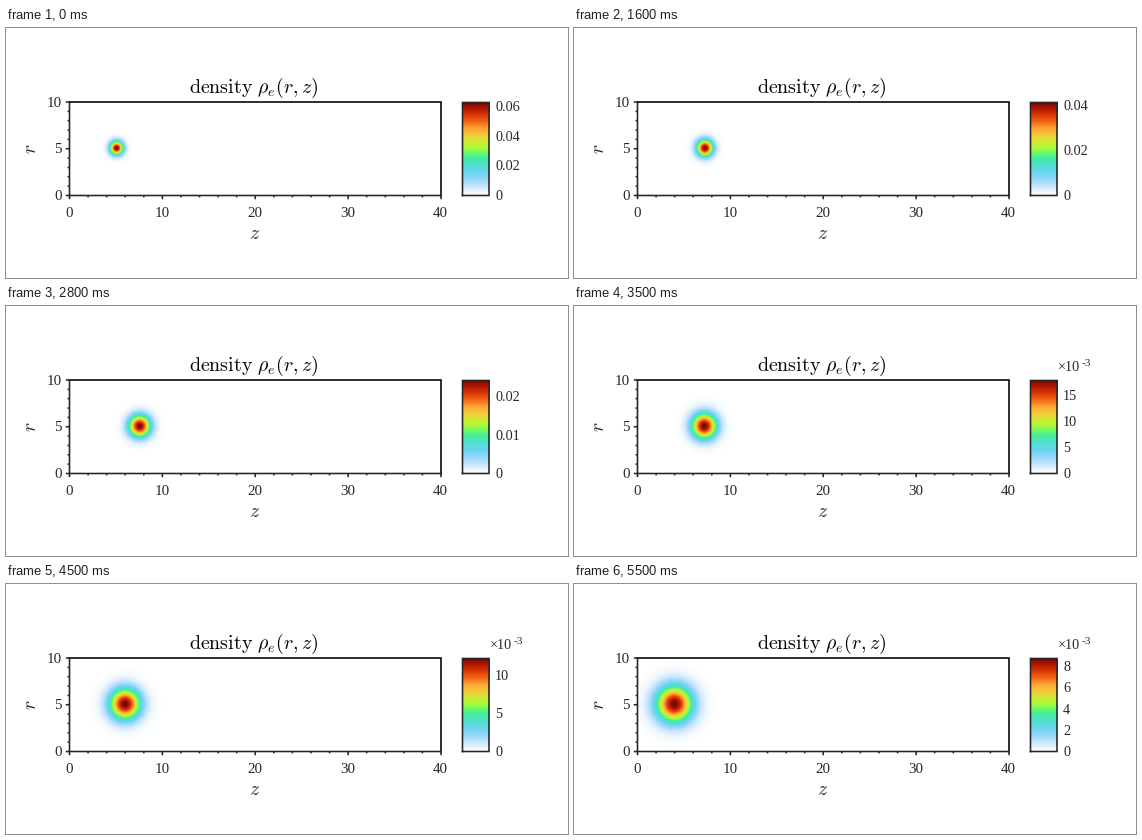
Recreate the animation shown at these times as a matplotlib script. Size 562x250 px, loop 5600 ms.

```python
import numpy as np
import matplotlib.pyplot as plt
from matplotlib.animation import FuncAnimation
from matplotlib.colors import LinearSegmentedColormap

W, H, DPI = 562, 250, 100
FRAMES, STEP_MS = 56, 100
LEFT, RIGHT, TOP, BOTTOM = 63.5, 435, 74, 167.5
BAR_L, BAR_R, BAR_T = 456.5, 483, 74.5
SCALE = (RIGHT - LEFT) / 40          # pixels per unit of z and r
INK = "#262626"

plt.rcParams["font.family"] = "Liberation Serif"
plt.rcParams["mathtext.fontset"] = "cm"

# white fading into a turbo-like rainbow
STOPS = [
    (0.00, "#ffffff"), (0.08, "#d0e8fd"), (0.16, "#98d9fa"),
    (0.24, "#6cd4f0"), (0.30, "#58dcdc"), (0.35, "#4be4be"),
    (0.40, "#46ee9e"), (0.45, "#66f96e"), (0.50, "#a4fc3c"),
    (0.56, "#c8ef34"), (0.61, "#e4da38"), (0.66, "#f5c33a"),
    (0.72, "#fda331"), (0.79, "#f36315"), (0.86, "#db3a07"),
    (0.93, "#b11901"), (1.00, "#7a0403"),
]
cmap = LinearSegmentedColormap.from_list("density", STOPS, N=512)


def px(n):
    """Pixels to points."""
    return n * 72 / DPI


def label(x, y, s, size, **kw):
    opts = dict(ha="center", va="baseline", color=INK)
    opts.update(kw)
    return ax.text(x, y, s, fontsize=px(size), **opts)


def line(xs, ys, color=INK, cap="projecting"):
    ax.plot(xs, ys, color=color, lw=px(1.6), solid_capstyle=cap,
            solid_joinstyle="miter", snap=False, zorder=4)


fig = plt.figure(figsize=(W / DPI, H / DPI), dpi=DPI, facecolor="white")
ax = fig.add_axes([0, 0, 1, 1])
ax.axis("off")

# density field, sampled twice per pixel
xs = np.arange(LEFT, RIGHT, 0.5) + 0.25
ys = np.arange(TOP, BOTTOM, 0.5) + 0.25
z = (xs - LEFT) / SCALE
r = (BOTTOM - ys) / (BOTTOM - TOP) * 10
field = ax.imshow(np.zeros((len(r), len(z))), cmap=cmap, vmin=0, vmax=1,
                  extent=(LEFT, RIGHT, BOTTOM, TOP), aspect="auto",
                  interpolation="bilinear", zorder=1)
ax.imshow(np.linspace(1, 0, 256)[:, None], cmap=cmap, vmin=0, vmax=1,
          extent=(BAR_L, BAR_R, BOTTOM, BAR_T), aspect="auto",
          interpolation="bilinear", zorder=1)
ax.set_xlim(0, W)
ax.set_ylim(H, 0)

line([LEFT, RIGHT, RIGHT], [TOP, TOP, BOTTOM], color="black")
line([LEFT, LEFT, RIGHT], [TOP, BOTTOM, BOTTOM])
line([BAR_L, BAR_R, BAR_R, BAR_L, BAR_L], [BOTTOM, BOTTOM, BAR_T, BAR_T, BOTTOM])

for v in range(0, 41, 2):
    x = LEFT + v * SCALE
    major = v % 10 == 0
    line([x, x], [BOTTOM, BOTTOM + (3.7 if major else 1.9)], cap="butt")
    if major:
        label(x - 0.5, 189, str(v), 15)
for v in range(11):
    y = BOTTOM - v * (BOTTOM - TOP) / 10
    major = v % 5 == 0
    line([LEFT - (3.7 if major else 1.9), LEFT], [y, y], cap="butt")
    if major:
        label(55.5, y + 4.6, str(v), 15, ha="right")

label(248.2, 64.5, r"$\mathrm{density}\ \rho_e(r,z)$", 19.95, color="black")
label(249, 211, "$z$", 19.6)
label(26, 120.5, "$r$", 19.6, rotation=90, va="center")

ticks = [label(489, 0, "", 14.3, ha="left") for _ in range(6)]
power = [label(484.2, 65.4, "×10", 14.3, ha="left"),
         label(507.4, 59.6, "-3", 11.3, ha="left")]


def draw(i):
    t = i * STEP_MS / 1000
    spread = 1 + 0.2035 * t * t
    peak = 0.0627 / spread
    center = 7.53 - 0.402 * (t - 2.5) ** 2
    var = 0.25 * spread
    field.set_data(np.outer(np.exp(-(r - 5) ** 2 / (2 * var)),
                            np.exp(-(z - center) ** 2 / (2 * var))))

    # widest step that still fits twice below the peak
    step = next(s for s in (0.02, 0.01, 0.005, 0.002) if peak >= 2 * s)
    milli = step < 0.01
    for k, tick in enumerate(ticks):
        value = k * step
        tick.set_visible(value <= peak)
        tick.set_text(f"{value * 1000 if milli else value:g}")
        tick.set_y(BOTTOM - (BOTTOM - BAR_T) * value / peak + 4.5)
    for part in power:
        part.set_visible(milli)
    return [field, *ticks, *power]


anim = FuncAnimation(fig, draw, frames=FRAMES, interval=STEP_MS,
                     init_func=lambda: draw(0), repeat=True, repeat_delay=0)
plt.show()
```
